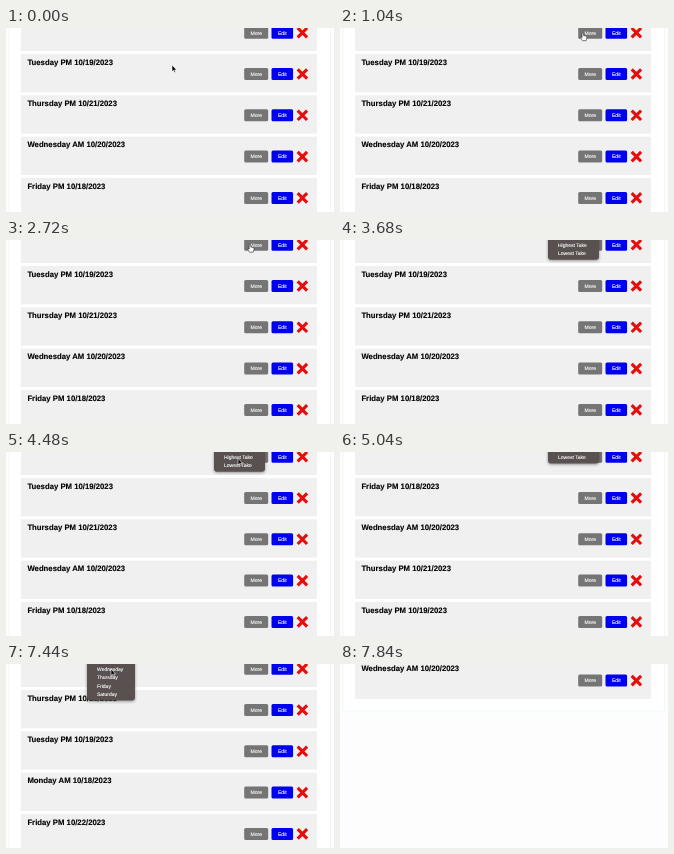
Animation of 328x184 px, one loop 8000 ms. Source, as an HTML page:

```html
<!DOCTYPE html>
<html lang="en">
<head>
<meta charset="utf-8">
<title>Shift list</title>
<style>
  html, body { margin: 0; width: 100%; height: 100%; overflow: hidden; background: #fdfdfd; }
  svg { display: block; width: 100vw; height: 100vh; }
  text { font: 5.1px "Liberation Sans", Arial, sans-serif; text-rendering: geometricPrecision; stroke: #000; stroke-width: .12; }
  .mid { text-anchor: middle; }
  .head { font-weight: bold; }
  .title { font-weight: bold; font-size: 7.75px; }
  .button { fill: #fff; stroke: #fff; }
  .menu { filter: drop-shadow(0 1px 1.5px #0006); }
  .menu text { font-size: 5px; fill: #fff; stroke: #fff; }
</style>
</head>
<body>
<svg id="stage" viewBox="0 0 328 184"></svg>
<script>
const LOOP = 8000, STEP = 80, PITCH = 41.3, TABLE_HEIGHT = 28;
const stage = document.getElementById('stage');

const tue = 'Tuesday PM 10/19/2023', thu = 'Thursday PM 10/21/2023',
  wed = 'Wednesday AM 10/20/2023', fri = 'Friday PM 10/18/2023',
  mon = 'Monday AM 10/18/2023', lateFri = 'Friday PM 10/22/2023';

// The title of the topmost card is scrolled out of view
const unsorted = ['', tue, thu, wed, fri];

// Each menu opens, is picked from, then closes and leaves a new list
const menus = [
  { open: 3600, pick: 4400, close: 4640, x: 208, w: 51,
    items: ['Highest Take', 'Lowest Take'], result: ['', fri, wed, thu, tue] },
  { open: 4960, pick: 5760, close: 5920, x: 208, w: 51,
    items: ['Lowest Take'], result: ['', thu, tue, mon, lateFri] },
  { open: 6480, pick: 6720, close: 7760, x: 81, w: 48,
    items: ['Wednesday', 'Thursday', 'Friday', 'Saturday'], result: [wed] }
];

const rect = (x, y, w, h, fill, r = 0, extra = '') =>
  `<rect x="${x}" y="${y}" width="${w}" height="${h}" rx="${r}" fill="${fill}" ${extra}/>`;
const label = (x, y, s, cls = '') => `<text x="${x}" y="${y}" class="${cls}">${s}</text>`;
const button = (x, y, w, s, fill) =>
  rect(x, y - 6, w, 12, fill, 1.5) + label(x + w / 2, y + 1.8, s, 'mid button');

// y is the vertical centre of the card's title
function card(title, y, extra) {
  const c = y + 12;
  return rect(15, y - 8, 296, 38.3 + extra, '#f0f0f0') +
    label(21.4, y + 2.6, title, 'title') +
    button(238.2, c, 24, 'More', '#757575') + button(265.5, c, 21.6, 'Edit', '#0000f0') +
    `<path d="M291.7 ${c - 4.7}l9.4 9.4m0-9.4l-9.4 9.4" stroke="#e60d0d" stroke-width="3.1"/>`;
}

// Columns are as wide as their headings, plus an equal share of the rest
const heads = ['Sales', 'Credit Tip', 'Cash Tip', '% Tip', 'Take Home'];
const values = ['2533', '400', '100', '19.74', '341.69'];
const pen = document.createElement('canvas').getContext('2d');
pen.font = 'bold 51px "Liberation Sans", Arial, sans-serif';
const widths = heads.map(s => pen.measureText(s).width / 10);
const pad = (266 - widths.reduce((a, b) => a + b)) / heads.length;

function table() {
  let x = 30.3;
  return rect(x, 13.5, 266, 27, 'none', 0, 'stroke="#222"') + heads.map((s, i) => {
    const w = widths[i] + pad, mid = x + w / 2;
    const cells = [13.5, 27].map(y => rect(x, y, w, 13.5, 'none', 0, 'stroke="#333" stroke-width=".8"'));
    x += w;
    return cells.join('') + label(mid, 22.3, s, 'mid head') + label(mid, 35.9, values[i], 'mid');
  }).join('');
}

function menu(m, t) {
  return `<g class="menu" opacity="${m.close - t <= STEP ? 0.5 : 1}">` +
    rect(m.x, -10, m.w, 13 + m.items.length * 8.4, '#585150', 3) +
    m.items.map((s, i) => label(m.x + 10, 6.7 + i * 8.4, s)).join('') + '</g>';
}

const ease = (t, from, to) => {
  const u = Math.min(1, Math.max(0, (t - from) / (to - from)));
  return u * u * (3 - 2 * u);
};

function pointer(t) {
  let x, y;
  const m = menus.find(m => t >= m.pick && t < m.close);
  if (m) {
    // Wander over the items, returning to the first
    x = m.x + 24;
    y = 5 + 2 * (m.items.length - 1) * Math.sin((t - m.pick) / 720 * 2 * Math.PI);
  } else {
    // Travel to the first More button, later leave through the top
    const go = ease(t, 0, 1120), leave = ease(t, 2880, 3200);
    x = 166 + 78 * go - 16 * leave;
    y = 37 - 33 * go - 18 * leave;
  }
  const hand = !m && x > 238 && y < 11;
  return `<g transform="translate(${x} ${y})" stroke-width=".6">` + (hand
    ? '<path d="M-.8 .6Q0-.6 .8 .6V3L3.4 3.6Q4.3 4 4 5.5L3.2 8.2H-.4L-2.4 5.2Q-2.4 4.2-.8 5Z" fill="#fff" stroke="#222"/>'
    : '<path d="M0 0V6.6L1.5 5.3L2.5 7.6L3.6 7.1L2.6 4.9H4.6Z" fill="#000" stroke="#fff"/>') + '</g>';
}

function scene(t) {
  const last = menus.findLast(m => t >= m.close - STEP);
  const names = last ? last.result : unsorted;
  const filtered = names.length === 1;
  const extra = t >= 1680 && t < 2720 ? TABLE_HEIGHT : 0;
  const top = filtered ? 4.6 : -7.3;
  return rect(3, -20, 321.5, filtered ? 67 : 240, '#fff', 0, 'stroke="#eef8f9"') +
    names.map((s, i) => card(s, top + i * PITCH + (i && extra), i ? 0 : extra)).join('') +
    (extra ? table() : '') +
    menus.filter(m => t >= m.open && t < m.close).map(m => menu(m, t)).join('') +
    pointer(t);
}

let shown = -1;
const start = performance.now();
function draw() {
  const t = Math.floor((performance.now() - start) % LOOP / STEP) * STEP;
  if (t !== shown) stage.innerHTML = scene(shown = t);
  requestAnimationFrame(draw);
}
draw();
</script>
</body>
</html>
```
